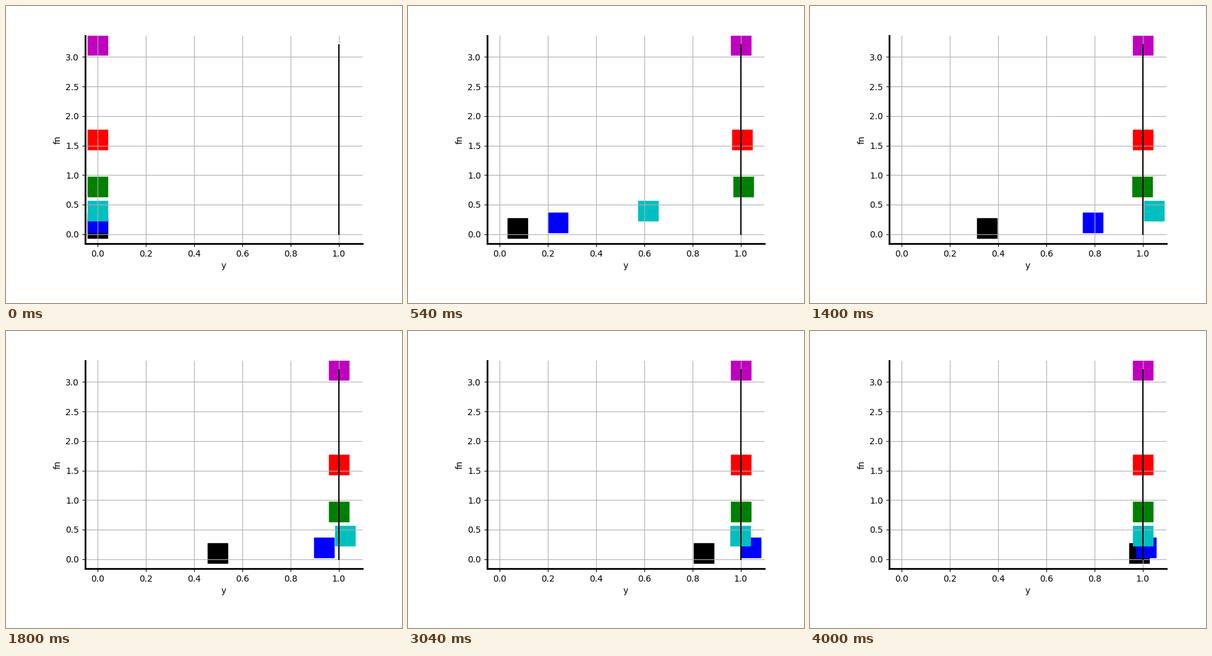
Animation of 640 by 480 pixels, one loop 4020 ms. Source, as a matplotlib script:

```python
import numpy as np
import matplotlib.pyplot as plt
from matplotlib.animation import FuncAnimation

FREQS = 0.1 * 2.0 ** np.arange(6)  # natural frequencies, Hz
COLORS = "kbcgrm"
ZETA = 0.7
STEPS = 200
FRAMES = 201
HOLD = 186  # this step stays for two ticks


def step_response(t, fn):
    """Unit step response of an underdamped second-order system."""
    w = 2 * np.pi * fn
    root = np.sqrt(1 - ZETA**2)
    wd = w * root
    return 1 - np.exp(-ZETA * w * t) * (np.cos(wd * t) + ZETA / root * np.sin(wd * t))


t = np.linspace(0, 5, STEPS)
y = np.array([step_response(t, fn) for fn in FREQS])

fig = plt.figure(figsize=(6.4, 4.8), dpi=100)
ax = fig.add_axes([0.2, 0.2, 0.7, 0.7])

marks = [
    ax.scatter(0, fn, s=500, marker="s", color=c) for fn, c in zip(FREQS, COLORS)
]
ax.plot([1, 1], [0, FREQS[-1]], "k", lw=1.5)

ax.set_xlim(-0.05 * y.max(), 1.05 * y.max())
ax.set_ylim(-0.05 * FREQS[-1], 1.05 * FREQS[-1])
ax.set_xlabel("y")
ax.set_ylabel("fn")
ax.grid(True)
for side in ("top", "right"):
    ax.spines[side].set_visible(False)
for side in ("left", "bottom"):
    ax.spines[side].set_linewidth(2)


def update(n):
    i = n - (n > HOLD)
    for mark, fn, x in zip(marks, FREQS, y[:, i]):
        mark.set_offsets([[x, fn]])
    return marks


anim = FuncAnimation(fig, update, frames=FRAMES, interval=20, repeat=True, repeat_delay=0)
plt.show()
```
